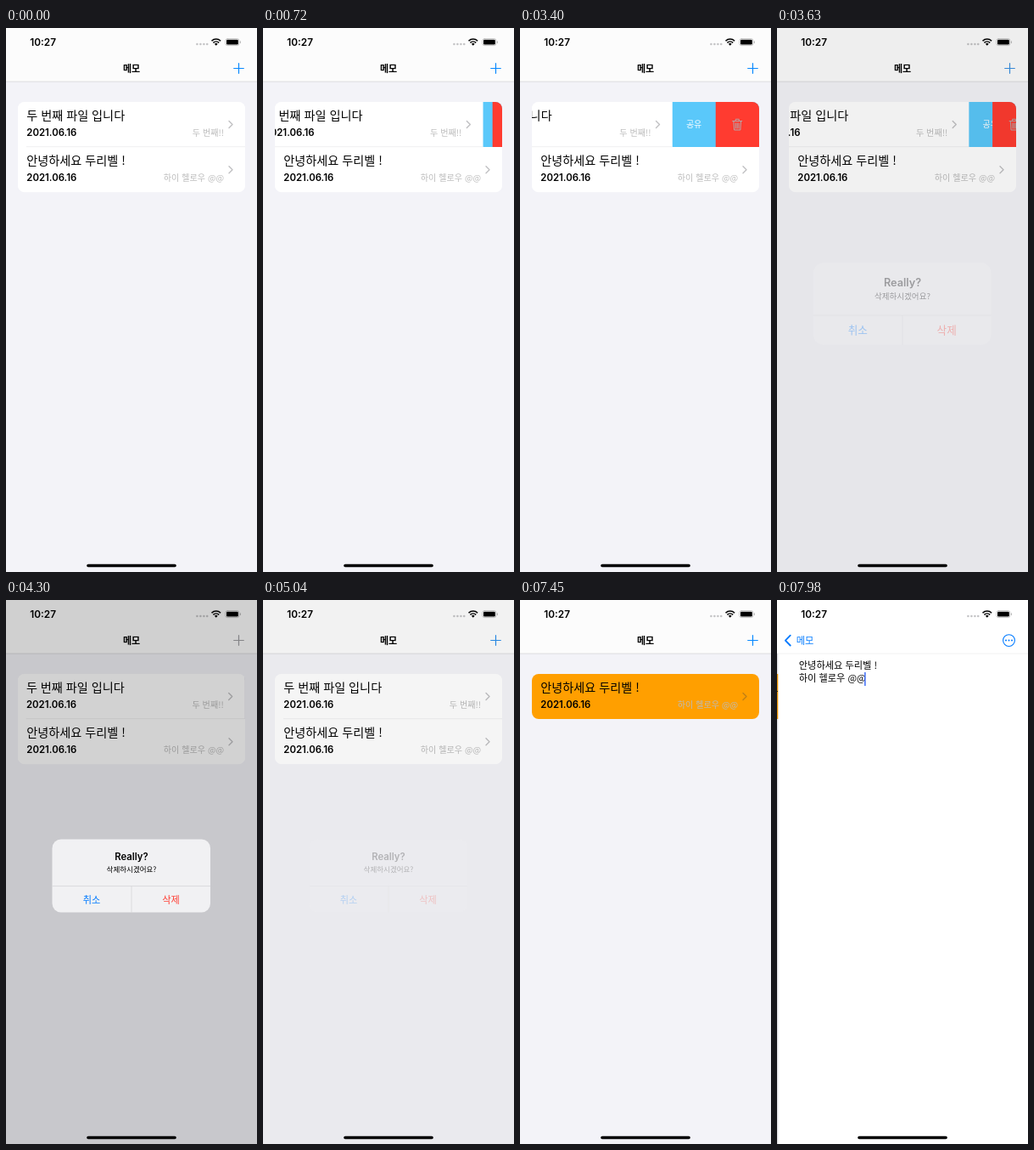
These frames come from a looping animation (296x640 px, 8 s). An HTML page:

```html
<!DOCTYPE html>
<html lang="ko">
<head>
<meta charset="utf-8">
<title>메모</title>
<style>
html, body { margin: 0; height: 100%; overflow: hidden; background: #fff; }
svg { display: block; width: 100vw; height: 100vh; font-family: Inter, "Noto Sans CJK KR", "Noto Sans CJK", sans-serif; }
.ko { font-family: "Noto Sans CJK KR", "Noto Sans CJK", sans-serif; }
.mid { text-anchor: middle; }
.line { fill: none; stroke-linecap: round; stroke-linejoin: round; }
.blue { fill: #007aff; }
.title { font-size: 14.15px; }
.date { font-size: 11.4px; font-weight: 600; }
.detail { font-size: 10.1px; fill: #bbb; text-anchor: end; }
</style>
</head>
<body>
<svg viewBox="0 0 296 640">
  <defs>
    <clipPath id="card"><rect id="cardBox" x="14" y="87" width="268" height="106" rx="8"/></clipPath>
  </defs>

  <g id="list">
    <rect width="296" height="640" fill="#f3f3f8"/>
    <g clip-path="url(#card)">
      <rect x="14" y="87" width="268" height="106" fill="#fff"/>
      <g id="first">
        <g id="share">
          <rect y="87" width="270" height="53" fill="#5ac8fa"/>
          <text class="ko mid" x="25.6" y="117" font-size="10" fill="#fff">공유</text>
        </g>
        <g id="trash">
          <rect y="87" width="270" height="53" fill="#ff3b30"/>
          <path class="line" stroke="#b5a5a8" d="M20 109.5h11M23.5 109v-1.7h4v1.7M21.2 110l.7 10h7.2l.7-10M23.7 112v6M25.5 112v6M27.3 112v6"/>
        </g>
        <g id="firstCell"></g>
      </g>
      <g id="secondCell"></g>
    </g>
    <rect id="listShade" width="296" height="640" opacity="0"/>
  </g>

  <g id="note">
    <rect width="296" height="640" fill="#fff"/>
    <g class="ko" font-size="11.2" font-weight="500">
      <text x="24.5" y="80.6">안녕하세요 두리벨 !</text>
      <text x="24.5" y="96.2">하이 헬로우 @@</text>
    </g>
    <rect x="101.8" y="85" width="1.5" height="16" fill="#3f6df6"/>
  </g>

  <rect width="296" height="63" fill="#fff"/>
  <rect id="bar" width="296" height="63" fill="#fcfcfc"/>
  <rect id="barLine" y="62.7" width="296" height=".7" fill="#d0d0d2"/>
  <text id="heading" class="ko mid" y="51.5" font-size="11" font-weight="700">메모</text>
  <path id="plus" class="line" stroke-width="1.2" d="M268.7 47.5h11.6M274.5 41.7v11.6"/>
  <g id="noteBar">
    <path class="line" stroke="#007aff" stroke-width="1.9" d="M15.7 41.7l-5.8 5.9 5.8 5.9"/>
    <circle cx="273.5" cy="47.6" r="6.9" class="line" stroke="#007aff" stroke-width="1.1"/>
    <path class="line" stroke="#007aff" stroke-width="2" d="M270 47.6h0M273.5 47.6h0M277 47.6h0"/>
    <text id="back" class="ko mid blue" y="51.5" font-size="11.2">메모</text>
  </g>

  <text x="28.3" y="21" font-size="11.8" font-weight="600">10:27</text>
  <path class="line" stroke="#c4c4c6" stroke-width="2.6" d="M225.4 19h0M229.4 19h0M233.4 19h0M237.2 19h0"/>
  <path fill="none" stroke="#000" stroke-width="1.6" d="M242.5 15.2a7.6 7.6 0 0 1 10.6 0M244.4 17.3a5 5 0 0 1 6.8 0"/>
  <path d="M247.8 20.8l-1.9-2a2.7 2.7 0 0 1 3.8 0z"/>
  <rect x="258.9" y="12.6" width="16" height="8" rx="2.3" class="line" stroke="#b8b8b8" stroke-width=".8"/>
  <rect x="260" y="13.7" width="13.8" height="5.8" rx="1.3"/>
  <rect x="275.8" y="15.2" width="1.1" height="2.8" rx=".5" fill="#b8b8b8"/>

  <rect id="dim" width="296" height="640" opacity="0"/>
  <rect x="95.2" y="630.8" width="105.6" height="3.4" rx="1.7"/>

  <g id="alert">
    <rect x="54.5" y="281.5" width="186.5" height="86" rx="10.5" fill="#f1f1f3"/>
    <path d="M54.5 336.6h186.5M148 336.6v31" stroke="#d2d2d5" stroke-width=".7"/>
    <g class="mid">
      <text x="148" y="306.3" font-size="11.3" font-weight="600">Really?</text>
      <g class="ko">
        <text x="148" y="320" font-size="8.5">삭제하시겠어요?</text>
        <text class="blue" x="101" y="356.5" font-size="11.2" font-weight="500">취소</text>
        <text x="194.5" y="356.5" font-size="11.2" fill="#ff3b30">삭제</text>
      </g>
    </g>
  </g>
</svg>

<script>
const LOOP = 8000, SWIPE = 102.5;
const $ = id => document.getElementById(id);
const set = (id, attrs) => { for (const k in attrs) $(id).setAttribute(k, attrs[k]); };
const move = (id, x, y = 0) => set(id, { transform: `translate(${x} ${y})` });
const part = (t, a, b) => Math.min(1, Math.max(0, (t - a) / (b - a)));
const smooth = p => p * p * (3 - 2 * p);
const out = p => 1 - (1 - p) ** 3;
const mix = (from, to, p) => `rgb(${from.map((v, i) => Math.round(v + (to[i] - v) * p))})`;

const cell = (name, title, detail) => `
  <rect id="${name}Back" x="14" y="87" width="268" height="53.3" fill="#fff"/>
  <text class="ko title" x="24.2" y="108.2">${title}</text>
  <text class="date" x="24.3" y="127.2">2021.06.16</text>
  <text class="ko detail" x="257" y="126.8">${detail}</text>
  <path class="line" stroke="#3c3c43" stroke-opacity=".32" stroke-width="1.4" d="M263 109.6l4 4-4 4"/>`;
$('firstCell').innerHTML = cell('first', '두 번째 파일 입니다', '두 번째!!') +
  '<path d="M24 140h258" stroke="#dedee1" stroke-width=".8"/>';
$('secondCell').innerHTML = cell('second', '안녕하세요 두리벨 !', '하이 헬로우 @@');

function swipe(t) {
  if (t >= 4820) return 0;
  const open = 95 * smooth(part(t, 470, 1260)) + (SWIPE - 95) * out(part(t, 1260, 1520));
  return open - (SWIPE - 0.3) * out(part(t, 3480, 4300));
}

function draw(t) {
  const d = swipe(t);
  move('firstCell', -d);
  move('share', 282 - d);
  move('trash', 282 - d / 2);

  const gone = smooth(part(t, 5330, 5690));
  set('first', { opacity: 1 - gone });
  move('secondCell', 0, 53.2 * (1 - gone));
  set('cardBox', { height: 106.2 - 53.2 * gone });
  set('secondBack', { fill: t >= 7450 ? '#ff9f00' : '#fff' });

  const shown = smooth(part(t, 3480, 3880));
  const fade = shown * (1 - smooth(part(t, 4800, 5150)));
  const scale = 1 + 0.18 * (1 - shown);
  set('dim', { opacity: 0.175 * fade });
  set('alert', {
    opacity: fade,
    transform: `translate(148 324.5) scale(${scale}) translate(-148 -324.5)`
  });

  const push = out(part(t, 7500, 8075));
  move('list', -88 * push);
  set('listShade', { opacity: 0.1 * push });
  move('note', 296 * (1 - push));
  set('bar', { opacity: 1 - push });
  set('barLine', { opacity: 1 - 0.6 * push });
  const x = 148 - 115.5 * push;
  set('heading', { x, opacity: Math.max(0, 1 - 1.6 * push) });
  set('back', { x });
  set('noteBar', { opacity: push });
  set('plus', {
    opacity: Math.max(0, 1 - 1.3 * push),
    stroke: mix([8, 136, 255], [160, 160, 164], fade)
  });
}

const start = performance.now();
function tick() {
  draw((performance.now() - start) % LOOP);
  requestAnimationFrame(tick);
}
tick();
</script>
</body>
</html>
```
